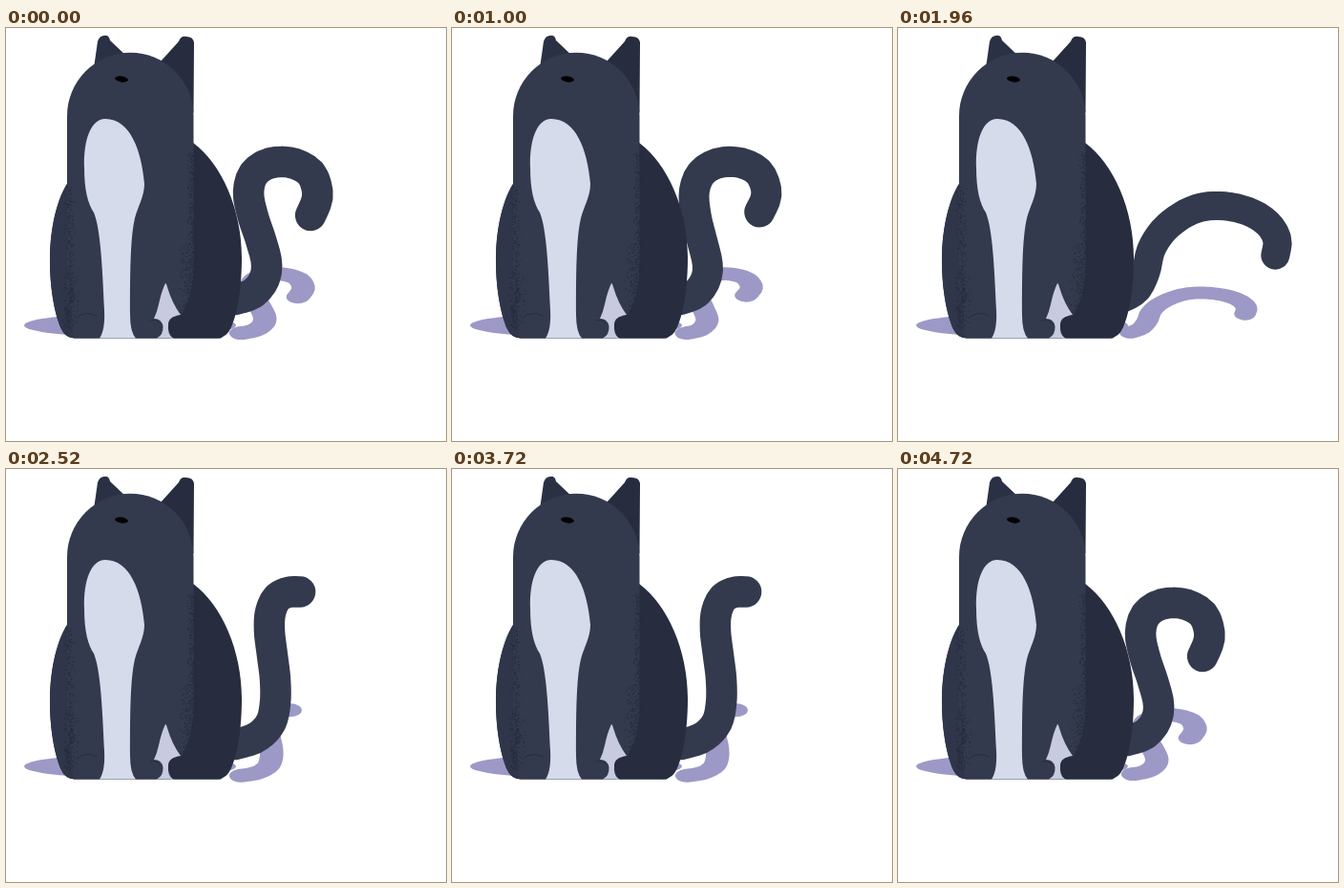
An HTML page with a canvas that plays this animation: 461 px wide and 432 px high, repeating every 4800 ms.

```html
<!DOCTYPE html>
<html lang="en">
<head>
<meta charset="utf-8">
<title>Sitting cat</title>
<style>
html, body { margin: 0; width: 100%; height: 100%; overflow: hidden; background: #fff; }
canvas { display: block; width: 461px; height: 432px; }
</style>
</head>
<body>
<canvas id="stage" width="461" height="432"></canvas>
<script>
const ctx = document.getElementById('stage').getContext('2d');
const STEP = 40, CYCLE = 1200, REST = 1120, SEGS = 40;
const COAT = '#343a4d', DARK = '#272d3f', LIGHT = '#d5dbea', SHADE = '#9c99c6';

// Tail centre lines: time, stroke width, then x,y pairs from root to tip.
const curl = '240,284 258,278 270,264 273,246 267,222 259,198 254,174 258,155 270,144 287,140 305,143 320,153 326,170 325,182 319,196';
const poses = [
  [0, 32.5, curl],
  [120, 32.5, '240,288 262,281 277,266 282,245 282,220 279,195 276,170 277,150 284,135 296,129 308,128.5'],
  [360, 31, '235,281 253,292 270,311 290,330 315,340 340,342 365,339 388,329 404,312 410,296 406,281 396,269'],
  [520, 30.5, '235,272 258,272 280,275 298,285 313,304 326,332 342,360 362,382 385,394 404,392 418,380'],
  [590, 30.5, '236,275 258,268 281,266 303,271 321,286 335,307 348,332 361,357 374,379 388,397 402,412'],
  [720, 30, '236,281 250,273 262,256 273,235 290,220 312,211 335,208 360,212 385,222 404,236 414,252 414.5,268'],
  [REST, 32.5, curl]
].map(([time, width, text]) => ({ time, vals: encode(width, text) }));

function spline(a, b, c, d, u) {
  return b + 0.5 * u * (c - a + u * (2 * a - 5 * b + 4 * c - d + u * (3 * (b - c) + d - a)));
}

// A pose becomes [width, root x, root y, length, ...segment angles].
function encode(width, text) {
  const pts = text.split(' ').map(s => s.split(',').map(Number));
  const at = i => pts[Math.max(0, Math.min(pts.length - 1, i))];
  const line = [];
  for (let i = 0; i < pts.length - 1; i++) {
    for (let k = 0; k < 12; k++) {
      line.push([0, 1].map(j => spline(at(i - 1)[j], at(i)[j], at(i + 1)[j], at(i + 2)[j], k / 12)));
    }
  }
  line.push(at(pts.length));
  const dist = [0];
  for (let i = 1; i < line.length; i++) {
    dist.push(dist[i - 1] + Math.hypot(line[i][0] - line[i - 1][0], line[i][1] - line[i - 1][1]));
  }
  const total = dist[dist.length - 1];
  const vals = [width, ...line[0], total];
  let prev = line[0], last = 0, n = 1;
  for (let s = 1; s <= SEGS; s++) {
    const goal = total * s / SEGS;
    while (n < line.length - 1 && dist[n] < goal) n++;
    const u = (goal - dist[n - 1]) / (dist[n] - dist[n - 1]);
    const p = [0, 1].map(j => line[n - 1][j] + (line[n][j] - line[n - 1][j]) * u);
    let ang = Math.atan2(p[1] - prev[1], p[0] - prev[0]);
    ang -= 2 * Math.PI * Math.round((ang - last) / (2 * Math.PI));
    vals.push(ang);
    last = ang;
    prev = p;
  }
  return vals;
}

function slope(i, j) {
  if (i === 0 || i === poses.length - 1) return 0;
  const [a, b, c] = poses.slice(i - 1, i + 2);
  const h0 = b.time - a.time, h1 = c.time - b.time;
  const d0 = (b.vals[j] - a.vals[j]) / h0, d1 = (c.vals[j] - b.vals[j]) / h1;
  return (d0 * h1 + d1 * h0) / (h0 + h1);
}

function tailAt(t) {
  let i = 0;
  while (i < poses.length - 2 && t >= poses[i + 1].time) i++;
  const a = poses[i], b = poses[i + 1], h = b.time - a.time;
  const u = (t - a.time) / h, w = 1 - u;
  const vals = a.vals.map((v, j) =>
    v * (1 + 2 * u) * w * w + b.vals[j] * u * u * (3 - 2 * u) +
    h * u * w * (slope(i, j) * w - slope(i + 1, j) * u));
  const [width, x0, y0, len, ...angles] = vals;
  const path = new Path2D();
  let x = x0, y = y0;
  path.moveTo(x, y);
  for (const ang of angles) {
    x += Math.cos(ang) * len / SEGS;
    y += Math.sin(ang) * len / SEGS;
    path.lineTo(x, y);
  }
  return { path, width };
}

function fill(shape, color) {
  ctx.fillStyle = color;
  ctx.fill(typeof shape === 'string' ? new Path2D(shape) : shape);
}

function oval(x, y, rx, ry, turn, color) {
  const p = new Path2D();
  p.ellipse(x, y, rx, ry, turn, 0, 7);
  fill(p, color);
}

function drawTail({ path, width }, color) {
  ctx.strokeStyle = color;
  ctx.lineWidth = width;
  ctx.lineCap = ctx.lineJoin = 'round';
  ctx.stroke(path);
}

// Rounded triangle ear leaning sideways by dx and down by dy.
function ear(base, tip, dx, dy, color) {
  const [l, r] = base, [a, b] = tip.map(([x, y]) => [x + dx, y + dy]);
  const p = new Path2D();
  p.moveTo(...l);
  p.lineTo(...a);
  p.quadraticCurveTo(a[0] + 2, a[1] - 6, (a[0] + b[0]) / 2, Math.min(a[1], b[1]) - 5);
  p.quadraticCurveTo(b[0] - 1, b[1] - 6, ...b);
  p.lineTo(...r);
  p.lineTo(r[0] - 12, r[1] + 20);
  p.closePath();
  fill(p, color);
}

const haunch = new Path2D('M64 163C51 184 46 216 46 243C46 276 52 302 58 315Q62 324 72 324.5H222Q231 324 236 313C243 297 247 270 247 240C247 190 226 142 196 120Z');
const front = new Path2D('M64 92A66 66 0 0 1 196.5 92V250C195 285 188 302 172 324.5H72C64 310 64 280 64 250Z');
const bib = 'M104 95C89 95 81 117 82 146C82 170 86 184 92 193C99 210 101 250 103 295Q104 316 98 324.5H136Q130 318 130 300C130 260 130 220 135 199C138 187 145 176 145 163C142 128 130 95 104 95Z';
const gap = 'M167 267Q163 275 160 289Q158 298 155 304Q163 304 164.500 312Q165 321 158 324.5H175Q169 321 170 310Q170 302 183 300Q174 288 169 271Q168 267 167 267Z';

function grain(x, spread, y0, y1, count, color, seed) {
  ctx.fillStyle = color;
  const rnd = () => (seed = seed * 16807 % 2147483647) / 2147483647;
  for (let i = 0; i < count; i++) {
    const y = y0 + (y1 - y0) * rnd();
    ctx.fillRect(x + (rnd() - rnd()) * spread, y, 1.2, 1.2);
  }
}

function drawBody(twitch) {
  ear([[92, 42], [127, 30]], [[96, 14], [109, 13]], -2.5 * twitch, twitch, '#2b3144');
  ear([[162, 35], [196.5 - 3 * twitch, 88]], [[181, 14], [197, 15]], 4.5 * twitch, 2 * twitch, DARK);
  fill(haunch, DARK);
  ctx.save();
  ctx.clip(haunch);
  fill('M40 150H72V326H40Z', '#30364a');
  ctx.restore();
  fill(front, COAT);
  ctx.save();
  ctx.clip(haunch);
  grain(66, 6, 165, 315, 260, DARK, 17);
  grain(68, 10, 260, 312, 110, DARK, 91);
  grain(195, 6, 130, 290, 320, DARK, 43);
  grain(189, 10, 225, 305, 150, DARK, 7);
  ctx.restore();
  fill('M176 324.500Q169 318 170 309Q171 300 184 300L198 270H225V324.500Z', DARK);
  fill(bib, LIGHT);
  fill(gap, '#c8cbdf');
  ctx.strokeStyle = DARK;
  ctx.lineWidth = 1;
  ctx.stroke(new Path2D('M74 303Q84 295 95 301M151 306Q158 304 161 309'));
  oval(121, 53.5, 7, 3, 0.15, '#000');
}

function draw(ms) {
  const t = Math.min(REST, Math.floor(ms / STEP) * STEP % CYCLE);
  const tail = tailAt(t);
  const twitch = t > 200 && t < 520 ? Math.sin((t - 200) / 320 * Math.PI) ** 2 : 0;
  ctx.fillStyle = '#fff';
  ctx.fillRect(0, 0, 461, 432);
  oval(130, 311, 111, 12.5, 0, SHADE);
  ctx.save();
  ctx.transform(0.755, 0, 0, 0.43, 65, 197);
  drawTail(tail, SHADE);
  ctx.restore();
  drawTail(tail, COAT);
  drawBody(twitch);
}

const start = performance.now();
function tick() {
  draw(performance.now() - start);
  requestAnimationFrame(tick);
}
tick();
</script>
</body>
</html>
```
